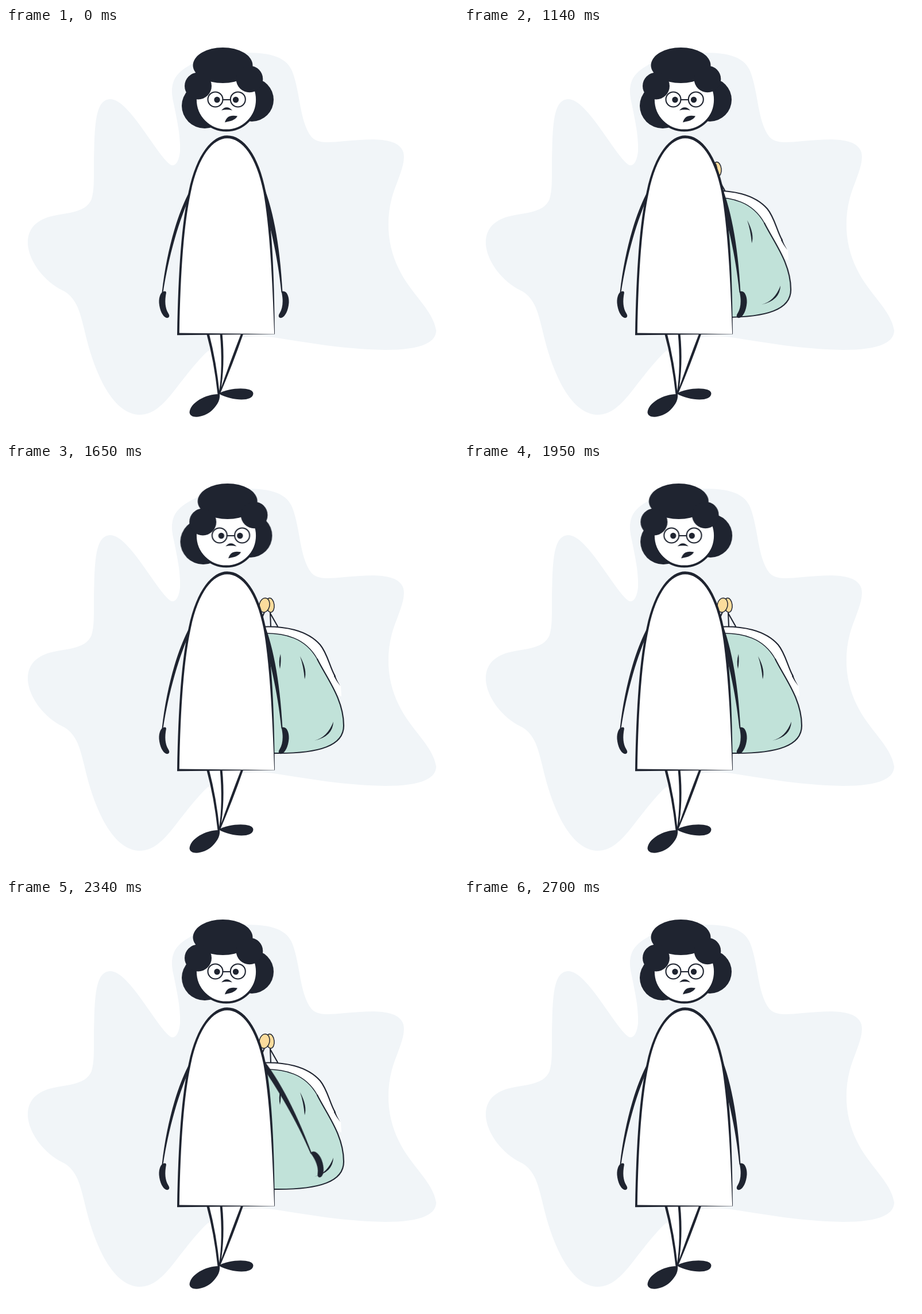
Animation, 787 px wide and 711 px high, one loop 4710 ms. Source, as an HTML page:

```html
<!DOCTYPE html>
<html lang="en">
<head>
<meta charset="utf-8">
<title>Hidden purse</title>
<style>
  html, body { margin: 0; width: 100%; height: 100%; overflow: hidden; background: #fff; }
  svg { display: block; width: 100vw; height: 100vh; }
  .soft { filter: blur(.55px); }
  .ink { fill: #1f2430; }
  .line { fill: none; stroke: #1f2430; stroke-width: 2.1px; stroke-linecap: round; }
  .thin { stroke-width: 1.5px; }
  .paper { fill: #fff; }
  .bag, .arm, .wrist, .turn {
    animation: 4710ms cubic-bezier(.333, 0, .667, 1) infinite;
  }
  .bag { animation-name: slide; }
  .arm { --angle: -18deg; animation-name: swing; transform-origin: 444px 286px; }
  .wrist { --angle: -7deg; animation-name: swing; transform-origin: 480px 461px; }
  .turn { animation-name: turn; }
  .back { --far: -2.6px; }
  .front { --far: 8.4px; }
  .face { --far: 7.5px; }
  .mouth { --far: 6.3px; }

  @keyframes slide {
    0%, 20.382% { transform: translateX(-125px); }
    25.478%, 50.955% { transform: translateX(0); }
    57.325%, 100% { transform: translateX(-125px); }
  }
  @keyframes turn {
    0%, 28.45% { transform: translateX(0); }
    34.395% { transform: translateX(var(--far)); }
    45.223% { transform: translateX(calc(var(--far) * -1)); }
    49.894%, 100% { transform: translateX(0); }
  }
  @keyframes swing {
    0%, 43.949% { transform: rotate(0deg); }
    50.318%, 50.955% { transform: rotate(var(--angle)); }
    57.325%, 100% { transform: rotate(0deg); }
  }
</style>
</head>
<body>
<svg viewBox="0 0 787 711" preserveAspectRatio="none">
  <defs>
    <clipPath id="side"><rect x="385" y="200" width="300" height="340"/></clipPath>
    <path id="hand" d="M278 459 C270 457 266 468 266.5 479 C267.5 492 273 503 279 505 C284 506 286 502 282.5 497 C277 488 276 476 279 461 Z"/>
  </defs>

  <g class="soft">
  <path fill="#f1f5f8" d="M180 124 C158 126 155 160 153.5 210 C152 255 155 278 149 298
    C138 325 100 321 72 330 C47 339 37 355 38 377 C40 404 62 437 94 455
    C122 467 128 492 136 524 C150 588 181 672 232 674 C275 674 295 620 347 567
    C372 543 420 533 465 539 C530 549 590 560 660 561 C715 561 749 551 749 527
    C743 490 705 464 684 420 C661 374 660 320 680 272 C689 248 695 232 692 217
    C684 189 634 193 590 197 C560 200 542 201 532 190 C511 163 513 115 499 77
    C488 46 449 43 418 43 C380 43 338 53 318 66 C286 84 286 106 292 132
    C299 166 304 190 303 215 C301 233 295 241 288 239 C265 227 213 120 180 124 Z"/>

  <!-- purse -->
  <g clip-path="url(#side)">
    <g class="bag">
      <path class="line" d="M450 258 L444 272 M460 259 L461 283 M460 260 L473 283"/>
      <g fill="#fbdc9c" stroke="#1f2430" stroke-width="1.5">
        <ellipse cx="460" cy="246" rx="7" ry="12.5" transform="rotate(-6 460 246)"/>
        <ellipse cx="450" cy="246" rx="9" ry="12.5" transform="rotate(12 450 246)"/>
      </g>
      <path class="paper" d="M440 284 C485 281 525 290 547 315 C562 333 565 360 583 387 L584 405 L570 400 L500 320 L440 300 Z"/>
      <path class="line" d="M440 284 C485 281 525 290 547 315 C560 331 563 352 573 370"/>
      <path class="ink" d="M572 366 Q576 377 582 387 Q575 378 571 370 Z"/>
      <path fill="#c1e2d9" d="M430 296 C490 291 523 306 542 340 C559 374 588 410 588 456 C588 490 548 505 467 504 L430 504 Z"/>
      <path class="line thin" d="M430 296 C490 291 523 306 542 340"/>
      <path class="line" d="M542 340 C559 374 588 410 588 456 C588 490 548 505 467 504"/>
      <path class="ink" d="M478 331 Q474 344 477 357 Q479.5 344 478 331 Z M512 335 Q518 352 520 375 Q525 359 512 335 Z M537 482 Q560 476 570 449 Q569 475 537 482 Z"/>
    </g>
  </g>

  <!-- arms -->
  <path class="ink" d="M321 282 C300 320 280 385 271.5 461 L273.5 461 C283 398 300 340 319 296 Z"/>
  <use href="#hand" class="ink"/>
  <g class="arm">
    <path class="ink" d="M444 264 C464 310 477 375 481.5 461 L479.5 461 C473 395 458 335 443 285 Z"/>
    <g class="wrist">
      <use href="#hand" class="ink" transform="matrix(-1 0 0 1 759 0)"/>
    </g>
  </g>

  <!-- legs and shoes -->
  <path class="paper" d="M351 532 L370 637 L411 532 Z"/>
  <path class="ink" d="M349 532 Q362 580 368.5 638 L372 638 Q366.5 582 353.5 532 Z
    M372.5 532 Q378 590 370.5 638 L373 637 Q382 588 376.5 532 Z
    M409.5 532 Q390 582 371 637 L373 637 Q394 588 413.5 532 Z"/>
  <path class="ink" d="M372 638 C349 637 320 653 319.5 670 C321 683 347 678 359 666 C370 655 373 646 372 638 Z"/>
  <path class="ink" d="M370 637 C390 626 430 625 430.5 637 C430 652 393 650 370 637 Z"/>

  <!-- dress -->
  <path class="ink" d="M298 535.3 C300 420 306 340 318 285 C332 218 360 187.3 385 187.3 C414 187.3 440 222 452.3 285 C463.5 345 467 430 468 533.5 Z"/>
  <path class="paper" d="M301.8 531.5 C303.8 420 310 340 321.8 286 C335 222 361 192.3 385 192.3 C411 192.3 436 224 448.3 286 C458.7 345 463.7 430 467.2 533.2 Z"/>

  <!-- head -->
  <g class="turn back ink">
    <ellipse cx="346" cy="135.5" rx="40" ry="39.5"/>
    <circle cx="428" cy="125" r="38"/>
  </g>
  <circle cx="383.5" cy="125" r="53.5" fill="#fff" stroke="#1f2430" stroke-width="3.8"/>
  <g class="turn face">
    <g class="line">
      <circle cx="364.5" cy="124.5" r="13"/>
      <circle cx="403.8" cy="124.5" r="13"/>
      <path d="M377.5 125 H390.5"/>
    </g>
    <circle class="ink" cx="367.5" cy="125" r="5.2"/>
    <circle class="ink" cx="400" cy="125" r="5.2"/>
    <path class="ink" d="M375 143.5 Q384 133 394 143.5 Q384 141 375 143.5 Z"/>
  </g>
  <path class="turn mouth ink" d="M381 164.5 C384 154 391 151 403 153.5 C399 161 391 162 381 164.5 Z"/>
  <g class="turn front ink">
    <ellipse cx="377.5" cy="65" rx="52" ry="31"/>
    <circle cx="334.5" cy="101" r="23.5"/>
    <circle cx="424" cy="89" r="23.3"/>
  </g>
  </g>
</svg>
</body>
</html>
```
